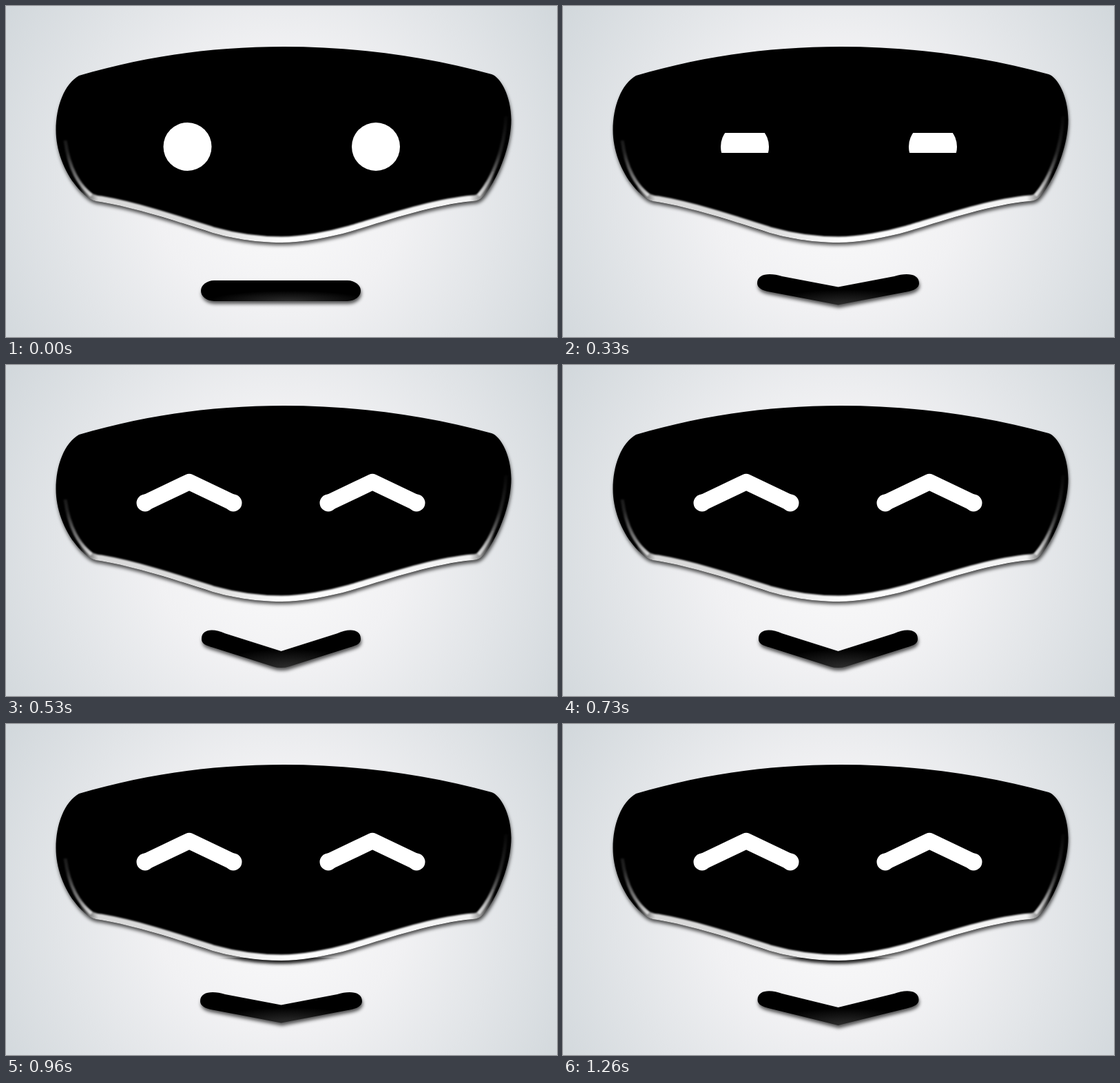
Write an HTML page that moves like this. It is 800 px wide and 480 px high and loops after 1.39 s.

```html
<!DOCTYPE html>
<html>
<head>
<meta charset="utf-8">
<title>Smiling visor</title>
<style>
  html, body { margin: 0; width: 100%; height: 100%; overflow: hidden; }
  svg { display: block; width: 800px; height: 480px; }
  filter { color-interpolation-filters: sRGB; }
</style>
</head>
<body>
<svg viewBox="0 0 800 480">
  <defs>
    <radialGradient id="backdrop" gradientUnits="userSpaceOnUse" cx="400" cy="255" r="470">
      <stop offset="0" stop-color="#fcfcfc"/>
      <stop offset=".4" stop-color="#f1f1f3"/>
      <stop offset="1" stop-color="#d2d8dc"/>
    </radialGradient>
    <linearGradient id="rimShade" gradientUnits="userSpaceOnUse" x1="100" x2="710" y1="0" y2="0">
      <stop offset=".01" stop-color="#fff" stop-opacity="0"/>
      <stop offset=".055" stop-color="#fff" stop-opacity=".85"/>
      <stop offset=".33" stop-color="#fff" stop-opacity=".87"/>
      <stop offset=".5" stop-color="#fff"/>
      <stop offset=".94" stop-color="#fff" stop-opacity=".95"/>
      <stop offset="1" stop-color="#fff" stop-opacity="0"/>
    </linearGradient>
    <linearGradient id="glintShade" gradientUnits="userSpaceOnUse" x1="0" x2="0" y1="150" y2="276">
      <stop offset="0" stop-color="#fff" stop-opacity="0"/>
      <stop offset=".5" stop-color="#fff" stop-opacity=".14"/>
      <stop offset="1" stop-color="#fff" stop-opacity=".7"/>
    </linearGradient>
    <radialGradient id="mouthShade" cx=".55" cy="1" r=".5">
      <stop offset="0" stop-color="#2e2e2e"/>
      <stop offset="1" stop-color="#000"/>
    </radialGradient>
    <filter id="shadow" x="-10%" y="-20%" width="120%" height="160%">
      <feDropShadow dx="1" dy="4" stdDeviation="2.7" flood-opacity=".65"/>
    </filter>
    <filter id="soft" filterUnits="userSpaceOnUse" x="0" y="0" width="800" height="480">
      <feGaussianBlur stdDeviation="1.2"/>
    </filter>
    <path id="visor" d="M106 101C200 73 300 59 403 59C505 59 610 73 705 99
      C718 103 733.5 131 733.5 165C733.500 205 712 255 693 276Q687 283 678 283
      C620 288 550 312 500 327C470 335.5 430 343 400 343C360 343 325 336 300 329
      C250 313 190 293 137 284Q125 283 118 277C90 255 72.5 215 72.5 180C72.5 145 85 113 106 101Z"/>
    <clipPath id="inVisor"><use href="#visor"/></clipPath>
    <clipPath id="lower"><rect y="240" width="800" height="120"/></clipPath>
    <clipPath id="lids"><rect y="184" width="800" height="29"/></clipPath>
    <clipPath id="chinArea"><rect x="281" y="339" width="239" height="110"/></clipPath>
  </defs>

  <rect width="800" height="480" fill="url(#backdrop)"/>
  <use href="#visor" filter="url(#shadow)"/>
  <g id="chinShadow" clip-path="url(#chinArea)"><use href="#visor" filter="url(#shadow)"/></g>
  <g clip-path="url(#inVisor)" fill="none">
    <use href="#visor" stroke="url(#rimShade)" stroke-width="17" filter="url(#soft)" clip-path="url(#lower)"/>
    <g stroke="url(#glintShade)" stroke-width="5" filter="url(#soft)">
      <path d="M726 160C724 205 708 248 686 275"/>
      <path d="M86 195C92 238 106 259 124 275"/>
    </g>
  </g>

  <g id="roundEyes" fill="#fff">
    <ellipse cy="204" ry="35"/>
    <ellipse cy="204" ry="35"/>
  </g>
  <g id="happyEyes" fill="none" stroke="#fff" stroke-linecap="round" stroke-linejoin="round">
    <path d="M202 200L266 169.500L330 200M468 200L532 169.500L596 200" stroke-width="23.500"/>
    <path d="M202 200h0M330 200h0M468 200h0M596 200h0" stroke-width="25"/>
  </g>
  <path id="mouth" fill="url(#mouthShade)" filter="url(#shadow)"/>
</svg>
<script>
  const $ = id => document.getElementById(id);
  const [leftEye, rightEye] = $('roundEyes').children;

  // Bent bar, mirrored about x = 399.5; round softens the lower corner.
  function smile(mid, slope, end, round) {
    const join = mid - 82 * slope, base = mid + 26, low = base - 100 * slope;
    const side = join + 13 - 16 * slope, corner = base - round * slope;
    const top = join - 18 * slope - 1.5, m = x => 799 - x;
    return `M399.5 ${mid}L318 ${join}
      C302 ${top} ${end} ${top} ${end} ${side}
      C${end} ${side + 7} 290 ${low - 10 * slope} 300 ${low}
      L${399.5 - round} ${corner}Q399.5 ${base} ${399.5 + round} ${corner}L${m(300)} ${low}
      C${m(290)} ${low - 10 * slope} ${m(end)} ${side + 7} ${m(end)} ${side}
      C${m(end)} ${top} ${m(302)} ${top} ${m(318)} ${join}Z`;
  }

  const flat = 'M302 398H496A19 15 0 0 1 496 428H302A19 15 0 0 1 302 398Z';
  const slight = smile(407.5, .19, 282, 0);
  const medium = smile(411, .244, 282.5, 0);
  const wide = smile(415, .315, 284, 12);

  const poses = [
    { until: 330, mouth: flat, eyes: [263.5, 537, 35] },
    { until: 430, mouth: slight, eyes: [264, 537, 35], squint: true },
    { until: 530, mouth: medium, eyes: [265.5, 532, 76.5], squint: true },
    { until: 860, mouth: wide },
    { until: 960, mouth: medium, chin: true },
    { until: 1060, mouth: slight, chin: true },
    { until: 1390, mouth: medium, chin: true }
  ];

  const show = (id, on) => $(id).style.display = on ? '' : 'none';

  function draw(now) {
    const time = now % 1390;
    const { mouth, eyes, squint, chin } = poses.find(p => time < p.until);
    $('mouth').setAttribute('d', mouth);
    show('happyEyes', !eyes);
    show('roundEyes', eyes);
    show('chinShadow', chin);
    if (eyes) {
      const [left, right, radius] = eyes;
      leftEye.setAttribute('cx', left);
      rightEye.setAttribute('cx', right);
      for (const eye of [leftEye, rightEye]) eye.setAttribute('rx', radius);
      $('roundEyes').setAttribute('clip-path', squint ? 'url(#lids)' : 'none');
    }
    requestAnimationFrame(draw);
  }
  draw(performance.now());
</script>
</body>
</html>
```
